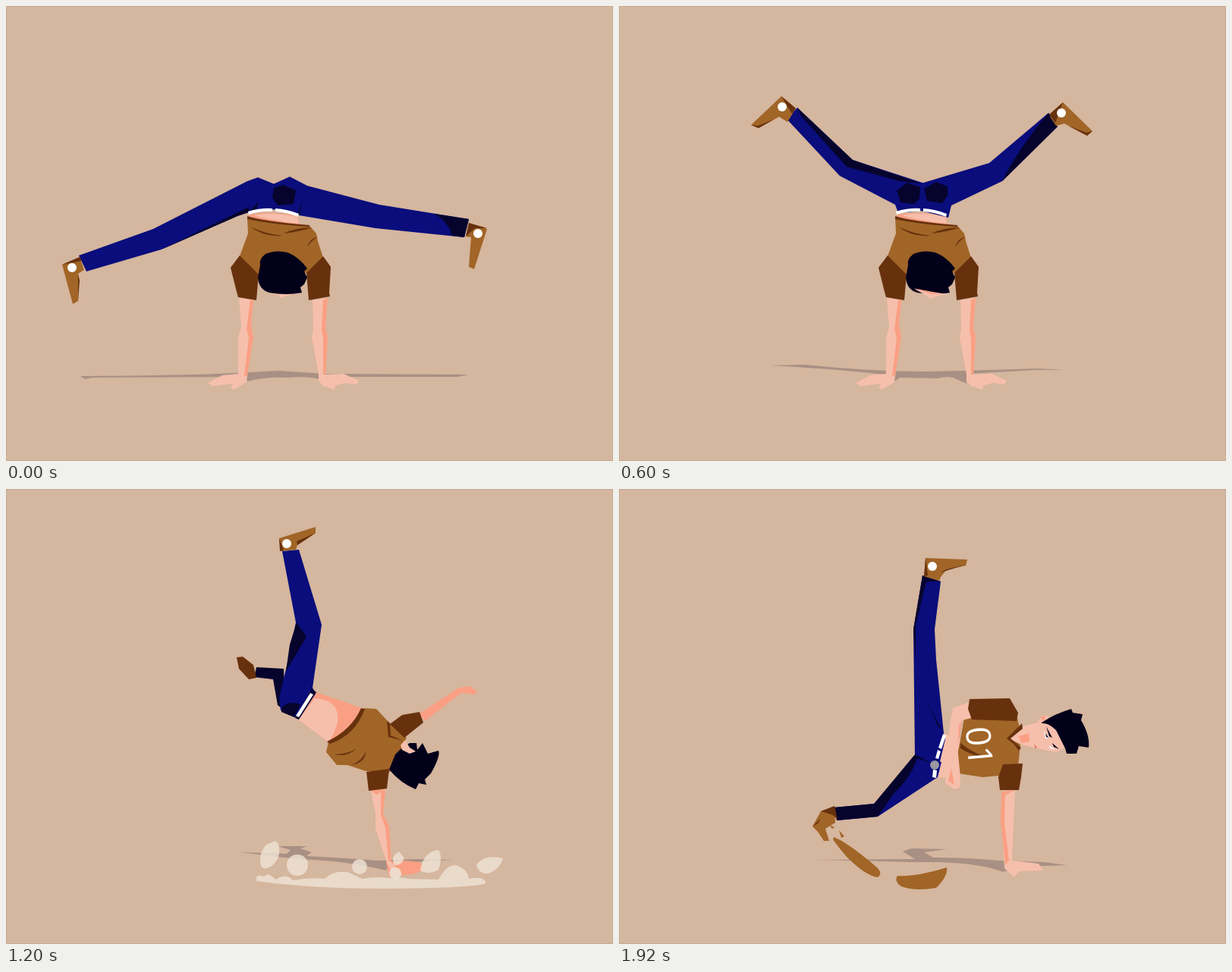
These frames come from a looping animation (800x600 px, 1.95 s). An HTML page with a canvas:

```html
<!DOCTYPE html>
<html lang="en">
<head>
<meta charset="utf-8">
<title>Breakdancer</title>
<style>
html, body { margin: 0; width: 100%; height: 100%; overflow: hidden; background: #d5b69e; }
canvas { display: block; }
</style>
</head>
<body>
<canvas id="stage" width="800" height="600"></canvas>
<script>
const ctx = document.getElementById('stage').getContext('2d');
const LOOP = 1950, STEP = 30, SAMPLES = 90, FX_TIME = 95;
const colours = {
  n: '#0a0d7b', d: '#06042d', b: '#a16527', k: '#68310e', s: '#f6bfac', o: '#fa9f83',
  h: '#03001a', g: '#a99084', w: '#fff', m: '#9a98a0', r: '#d9654f', u: 'rgba(238,226,213,.82)'
};

// Moves or mirrors part lines; mirroring also swaps left and right limbs.
function move(lines, sx, dx, dy = 0) {
  return lines.map(line => {
    const text = line.replace(/(\d+) (\d+)/g, (_, x, y) => `${sx * x + dx} ${+y + dy}`);
    return sx > 0 ? text : text.replace(/(arm|sleeve)([LR])/g, (_, p, c) => p + (c === 'L' ? 'R' : 'L'));
  });
}

// Part line: "name>parent colour shape"; shape is a path, O (dot) or T (number on the shirt).
const upper = [
  'armL s M307 385 326 388 323 420 326 437 318 487 317 496 300 506 296 503 300 498 272 501 266 497 285 487 306 485 306 437 310 423Z',
  '>armL o M322 388 326 388 323 420 326 437 318 487 314 488 320 438 317 426Z',
  'armR s M404 388 424 385 421 425 424 437 421 486 445 485 465 494 462 499 446 497 434 501 433 506 418 501 412 494 412 486 403 437 405 425Z',
  '>armR o M418 388 424 385 421 425 424 437 421 486 418 486 418 438 416 427Z',
  'waist>torso o M320 275Q350 270 385 277L387 289Q345 288 320 278Z',
  '>torso s M326 276Q350 271 384 278L386 287Q350 283 326 276Z',
  'torso b M318 278Q335 286 400 290L409 300 411 310 418 332 397 352 333 356 308 330 319 300Z',
  '>torso k M318 277Q340 284 400 289L400 291Q350 288 318 281Z',
  '>torso k M322 291Q340 305 364 303Q340 300 322 291M366 300Q382 292 404 292Q385 298 366 300M397 318Q401 306 411 304Q403 309 397 318Z',
  'sleeveL k M308 329 296 345 304 377 306 384 330 388 333 354Z',
  'sleeveR k M418 330 428 344 426 378 427 383 399 388 396 352Z',
  'face>hair s M342 374 390 378 366 383 364 386 360 382Z',
  'hair h M335 342Q333 334 342 327Q355 321 371 325Q386 331 397 346L393 350 397 358 393 367 388 371 390 378Q370 382 347 378Q333 374 332 358Z'
];
const belt = '>torso w M319 271Q336 266 351 267L351 271Q336 270 320 275ZM355 267Q371 268 386 274L385 278Q370 272 355 271Z';
const handstand = (dx, legs) => [...legs.slice(0, 1), ...move(upper, 1, dx), ...legs.slice(1), ...move([belt], 1, dx)];

// Seated body, facing the viewer.
const seated = [
  'armL s M388 302 402 300 402 325 390 325Z',
  'armR s M449 386 470 388 466 420 490 488 508 496 505 500 476 504 452 420Z',
  '>armR o M449 387 455 388 454 420 450 420Z',
  'sleeveL k M377 306Q385 290 403 287L428 296 412 300 388 308Z',
  'torso b M384 300 404 290 425 295 450 311 468 334 445 348 441 365Q415 383 383 390L376 394 365 370 353 330 375 312Z',
  '>torso k M354 332 372 368Q378 382 384 389L376 394 362 365ZM362 345Q382 352 398 374Q382 356 362 345Z',
  'sleeveR k M453 338 468 334 477 352 471 387 446 389 442 372 443 350Z',
  '>torso k M428 294 420 308 416 318 425 315 451 312 446 308 426 311Z',
  '>hair s M432 288 428 298 427 310 446 313 456 298Z',
  '>hair o M434 295 431 308 438 309 446 297Z',
  'face>hair s M444 253Q434 272 431 288L434 294 447 299 466 299 478 296 477 286 456 256Z',
  '>hair w M443 262 451 266 449 269 442 266ZM452 276 463 281 460 285 452 281Z',
  '>hair h M443 258 451 266 452 263ZM451 273 466 281 466 284ZM445 263 448 265 445 267ZM455 278 459 280 456 282Z',
  '>hair r M437 285 445 289 444 291ZM446 269 440 277 444 279 441 276Z',
  'hair h M453 250 450 242 460 235 464 224Q471 219 479 234Q491 239 496 252L504 249 503 262 499 269 503 273Q492 283 475 288L471 293 465 280Q455 270 450 257L446 248Z'
];
const bigShoe = 'M322 500Q318 470 330 460Q355 450 380 448L440 422 490 415Q525 420 530 436Q520 470 470 500Q435 518 420 517Q392 517 382 526Q375 538 352 538Q322 532 322 500Z';
const shoeTrim = parent => [
  `>${parent} k M324 484Q324 462 335 449Q355 441 380 449Q366 462 360 474Q340 486 324 484Z`,
  `>${parent} w M333 473Q333 455 346 453Q356 455 357 461Q345 465 333 473Z`,
  `>${parent} k M359 478Q362 495 368 508L382 525 377 525Q365 508 359 478ZM378 449 440 421 425 424Q395 434 378 449Z`
];

const poses = [
  [0, handstand(0, [
    'shadow g M98 488Q250 487 300 484L360 481 420 485 610 486 595 489 430 489 412 492Q400 488 370 490Q340 489 318 495L316 489 115 490 104 492Z',
    'legA n M354 235 332 226 318 231 194 294 96 329 106 350 205 321 305 277 320 272 354 268Z',
    'legB n M352 235 374 225 397 237 492 262 610 281 604 305 487 293 386 276 352 268Z',
    '>legB d M564 274Q582 283 588 303L604 305 610 281Z',
    '>torso d M365 236 382 243 379 261 358 263 351 253 353 240ZM320 272 333 258 330 268ZM385 276 390 254 387 276Z',
    '>legA d M205 321 320 265 320 272 305 277Z',
    'shoeA b M74 341 88 393 95 389 95 353 103 348 97 331Z',
    '>shoeA k M74 341 97 331 100 336ZM95 353 97 362 95 389Z',
    '>shoeA w O 87 345 6',
    'shoeB b M634 294 617 347 610 344 613 305 606 304 610 286Z',
    '>shoeB k M606 304 610 286 634 293 618 293Z',
    '>shoeB w O 622 300 6'
  ])],
  [360, [
    'shadow g M307 479 330 478 480 492 522 495 505 499 480 496 330 488 320 487Z',
    ...seated,
    '>torso w T 402 338 34',
    'legB n M350 400 384 430 378 450 324 462Z',
    'legA n M384 430 372 390 352 330 314 203 302 206 328 372 341 408 324 462 378 450Z',
    '>legA d M302 206 312 204 346 325Q334 345 329 372Z',
    'shoeA b M298 193 301 207 313 203 329 190 329 183 314 187Z',
    '>shoeA w O 304 198 4',
    '- b M247 211Q270 199 299 196L296 202Q275 206 250 211ZM229 214Q212 217 198 231Q215 227 229 214ZM214 229Q203 231 195 239Q210 242 214 229ZM183 236Q158 246 149 265L150 272Q159 260 183 236Z',
    '- d M291 221Q265 228 252 244L255 246Q270 235 292 225ZM252 253 240 262 244 264ZM173 297Q155 315 144 343Q149 346 158 325Q167 312 174 299Z',
    'shoeB b ' + bigShoe,
    ...shoeTrim('shoeB'),
    '>shoeB k M425 518Q480 500 513 458Q525 436 485 414L508 410Q530 395 543 377L545 381Q520 410 517 418L531 435Q560 415 574 399L577 403Q540 450 505 488Q470 515 425 518Z',
    '>shoeB s M494 414Q508 414 517 421Q506 417 494 416Z',
    '- k M600 288Q607 291 600 305Q582 344 566 351Q561 349 570 340Q583 300 596 289ZM598 342Q600 350 580 385Q560 412 548 413Q544 408 555 392Q582 348 598 342Z'
  ]],
  [600, handstand(46, [
    'shadow g M200 474 245 473Q330 482 405 482Q500 480 550 478L588 480 550 480 458 485 458 498 440 490Q430 488 420 491L370 490 362 496 350 486Q290 479 200 474Z',
    'legA n M400 233 308 203 235 134 221 149 291 224 364 262 368 273 400 270Z',
    '>legA d M235 134 308 203 398 234 370 231 300 212 240 145Z',
    'legB n M398 234 488 207 566 141 578 159 505 231 438 263 434 279 398 270Z',
    '>legB d M566 141 578 159 505 231Q525 190 566 141Z',
    '>torso d M380 233 397 239 396 254 389 261 371 259 366 243ZM418 232 433 238 433 250 426 260 406 257 402 241Z',
    '>hair s M389 373 432 380 414 384 410 386 406 382Z',
    '>hair o M389 372 425 380 412 380Z',
    'shoeA b M214 119 174 157 184 161 211 146 222 153 233 135Z',
    '>shoeA k M214 119 233 135 228 142ZM174 157 184 161 205 149 183 158Z',
    '>shoeA w O 215 133 6',
    'shoeB b M585 127 624 165 617 171 587 155 576 158 568 146Z',
    '>shoeB k M585 127 567 143 575 154ZM624 165 617 171 592 158 616 167Z',
    '>shoeB w O 583 141 6'
  ])],
  [960, [
    'shadow g M360 492 395 489 385 482 430 481 490 479 455 484 490 487 520 496 460 492 425 494 395 495Z',
    'armL o M401 438 418 440 414 482 425 488 425 495 412 500 396 498 397 489 404 484Z',
    'armR o M488 350 492 336 515 348 533 408 529 420 517 421 506 412 512 406 525 404 508 360Z',
    'sleeveL k M420 360 430 358 425 375 421 374Z',
    'waist>torso s M419 352 422 302 435 285 457 318Q440 343 419 352Z',
    '>torso o M419 352 422 300 433 288 422 315Z',
    'torso b M420 352Q442 344 457 318L473 317 492 333 490 347 470 348 445 368 423 400Z',
    '>torso k M418 352Q441 343 456 318L460 320Q445 346 419 355Z',
    'sleeveR k M474 325 492 333 490 350 468 347Z',
    'legB n M414 262 385 270 394 260 430 235 460 210 481 169 492 172 470 234 438 265 434 280Z',
    '>legB d M460 210 481 169 492 172 470 236Q445 234 428 238Z',
    '>legA d M392 262 380 280 380 290 388 312ZM416 272 438 262 434 292 421 298Z',
    'legA n M414 262 392 262 387 300 384 345 375 391 422 402 418 370 421 306 422 280 434 264Z',
    '>legA d M419 345Q412 375 384 390L422 402 418 372Z',
    '>torso w M422 290 432 281 434 285 424 293Z',
    'face>hair s M431 376 438 373 440 364 470 351 478 360 476 378 442 386 432 383Z',
    '>hair o M431 376 437 374 440 386 433 383ZM449 359 456 358 455 367Z',
    '>hair w M441 375 451 369 453 373 443 379ZM458 366 471 360 472 364 460 369Z',
    '>hair h M443 381 453 374 453 377ZM459 367 472 364 460 370Z',
    'hair h M437 385 441 382 475 375 481 363 484 370 492 369 497 375 496 386 507 388Q503 403 478 409L470 420 463 415 457 417Q447 402 437 385Z',
    'shoeB b M498 162 516 187 511 189 493 175 487 171 487 165Z',
    '>shoeB w O 495 169 3',
    'shoeA b M380 392Q362 398 362 413Q366 430 382 436L448 464 494 469 504 451 465 421 422 402Z',
    '>shoeA k M465 421 504 451 494 469 448 464Q469 448 465 421ZM373 396 380 391 422 402 432 407Q400 399 373 396Z',
    '>shoeA w M384 397Q390 388 397 397Z',
    '- u M534 527Q555 516 570 519L565 523Q585 515 598 510Q612 509 614 516Q630 512 642 514L640 518Q660 512 676 503Q681 500 674 494Q675 487 683 488Q689 495 684 506Q670 518 600 525Z'
  ]],
  [1200, [
    'shadow g M308 479 370 481 375 476 358 471 397 471 388 474 403 479 396 484Q450 487 490 490L540 488 588 489 540 492 503 500 500 503Q450 490 385 488Z',
    'legA d M368 285 366 237 330 235 327 248 352 251 358 285 372 296Z',
    'shoeA k M326 232 312 221 304 222 307 237 320 251 330 249Z',
    'armR o M545 296 597 262 612 260 621 267 617 271 600 269 552 306Z',
    '>armL o M501 492 525 490 545 492 553 500 540 507 505 512Z',
    'armL s M481 398 500 396 497 428 505 445 508 492 522 509 512 514 501 490 487 448 487 428Z',
    '>armL o M494 397 500 396 497 428 505 445 508 492 504 490 500 447 494 430ZM481 398 500 396 488 403Z',
    'waist>torso o M409 268 472 290Q455 330 424 333L385 304Z',
    '>torso s M407 276Q441 278 437 308Q430 330 424 333L385 304Z',
    'legB n M372 225 382 176 364 82 386 80 416 179 404 262 408 270 385 303 362 292 360 275Z',
    '>legB d M383 176 396 195 369 240 374 205ZM364 287Q375 279 388 284L380 301 363 294ZM403 263 409 268 386 304 381 302Z',
    '>torso w M401 269 405 271 386 301 382 299Z',
    'torso b M472 289 488 290 504 307 528 328 505 374 474 372 450 364 436 364 422 347 425 333Q455 320 472 289Z',
    '>torso k M468 289 473 290Q460 325 427 336L423 333Q455 318 468 289M432 350Q450 350 462 342Q450 354 432 350M455 364Q470 358 474 346Q474 361 455 364M502 306 506 309 507 325 524 332 504 327Z',
    'sleeveR k M506 310 522 298 545 294 550 308 525 328Z',
    'sleeveL k M475 373 505 369 502 395 478 398Z',
    'hair h M522 341 532 335 541 335 542 344 549 335 556 349 570 345Q573 352 560 375L552 383 554 390 544 388 540 396Q520 388 505 370L513 350Z',
    'face>hair s M526 331 520 338 522 344 532 349 540 346 532 341Z',
    'shoeB b M360 65 408 50 408 58 384 74 382 80 362 82Z',
    '>shoeB k M360 65 366 81 361 82ZM383 69 408 58 384 74Z',
    '>shoeB w O 370 72 6',
    '- u M330 517Q328 506 340 511Q345 504 355 515Q370 506 378 516Q400 512 420 514Q430 503 450 505L470 514Q490 510 510 514Q520 511 530 514L570 515Q580 496 592 496Q608 500 610 514Q632 510 632 520Q620 526 500 527Q400 527 330 517Z',
    '- u M355 464Q364 470 358 488Q348 504 337 499Q331 483 343 469ZM570 476Q576 485 570 502Q556 510 546 503Q550 478 570 476ZM655 487Q652 500 636 507Q622 508 620 495Q632 481 655 487ZM525 487Q521 497 512 496Q506 485 518 478Z',
    '- u O 384 496 14',
    '- u O 466 498 10',
    '- u O 513 507 8'
  ]],
  [1680, [
    'shadow g M296 491 320 489 480 492 340 498 310 494Z',
    ...move(seated, -1, 835, -2),
    '>torso w T 433 334 -36',
    'legA n M480 400 446 430 450 450 502 463Z',
    'legB n M446 430 458 392 481 330 525 207 538 212 518 300 503 375 490 410 502 465 450 450Z',
    '>legB d M528 208 538 212 504 372Q500 346 487 330Z',
    'shoeB b M543 199 539 214 526 208 511 194 512 187 525 191Z',
    '>shoeB w O 535 203 4',
    '- n M488 418Q505 411 510 418Q505 427 488 428ZM488 436Q500 442 510 434Q525 432 536 412Q545 404 552 410Q551 420 535 424Q522 434 505 442L510 448 498 455Z',
    '- b M503 485 550 474 553 479 588 462Q615 435 620 405Q622 440 600 465Q560 510 510 527Q495 532 480 525ZM613 374Q620 385 618 399L614 390ZM589 455 597 450 593 457Z',
    ...move(['shoeA b ' + bigShoe, ...shoeTrim('shoeA')], -1, 825, 3),
    '>shoeA k M345 412 310 417Q295 430 298 442Q315 480 350 502L403 518Q330 485 312 450Q306 425 345 412Z'
  ]],
  [1920, [
    'shadow g M258 489 390 488 374 478 385 474 432 475 402 479 414 486Q460 486 500 490L560 492 590 496 530 498 506 505Q480 494 420 492L385 492Q320 490 258 489Z',
    'armR s M504 399 522 397 520 440 518 490 553 494 559 503 527 504 521 512 508 500 504 440Z',
    '>armR o M504 399 509 399 508 440 514 490 509 496 503 438ZM504 399 522 397 508 404Z',
    'waist>torso s M428 322 450 330 448 378 432 381 416 380 420 355Z',
    'legB n M390 355 388 185 400 114 424 122 416 185 418 225 428 322 430 330 418 380 390 360Z',
    '>legB d M388 185 400 114 424 122 405 122 391 180 391 225ZM403 272Q415 300 426 318L420 312Z',
    'legA n M392 350 385 360 338 415 283 420 287 437 341 432 420 380 425 360Z',
    '>legA d M390 350 336 415 283 420 287 437 341 432 362 402Q385 380 393 355L412 362Z',
    '>torso w M427 323 431 325 425 343 421 341ZM420 344 424 346 421 356 417 355ZM414 370 419 371 418 381 413 380Z',
    '>torso m O 416 364 6',
    'torso b M462 300 525 302 530 325 526 367 502 378 479 380 447 375 444 360 450 330 455 302Z',
    '>torso k M450 335Q465 347 480 352Q465 352 450 342Z',
    'armL s M440 289 462 281 464 302 452 305 446 340 450 380 449 394 442 396 430 388 434 345 436 310Z',
    '>armL o M438 368 442 390 434 385ZM452 305 446 340 448 312Z',
    'sleeveL k M462 277 515 276 526 295 524 306 465 304 460 290Z',
    'sleeveR k M506 363 532 362 530 380 527 397 502 397 500 380Z',
    '>torso w T 475 339 85',
    'face>hair s M514 329 535 312 552 308 556 300 563 298 575 312 588 340 577 347 560 344 530 337Z',
    '>hair o M527 326 540 322 541 333 530 335ZM555 301 562 299 561 307Z',
    '>hair k M531 309 511 329 520 336 527 345 530 341 516 329 532 316Z',
    '>hair w M560 319 566 329 562 329ZM567 338 575 344 568 342Z',
    '>hair h M563 313 571 328 567 326ZM571 335 580 343 573 340ZM562 322 566 328 563 327Z',
    '>hair r M547 336 551 341 549 342Z',
    'hair h M557 308Q575 296 596 290L598 295 611 297 609 305Q621 325 619 341L606 339 603 349 590 349 588 342Q582 330 576 318Q566 308 557 309Z',
    'shoeB b M404 91 459 93 457 101 432 106 424 116 422 121 402 115Z',
    '>shoeB k M404 91 407 114 402 115ZM424 110 457 100 431 106Z',
    '>shoeB w O 413 102 6',
    'shoeA b M266 425 255 445 262 452 270 464 277 464 272 448 285 440 284 418Z',
    '>shoeA k M266 425 284 418 288 436 282 430ZM255 445 266 434 262 441Z',
    '- b M283 459Q300 465 340 499Q348 507 341 512Q325 510 300 485Q285 467 282 462ZM367 510Q390 512 432 499Q434 510 418 526Q390 531 372 524Q362 517 367 510ZM290 450 297 458 293 460ZM277 443 284 446 281 448Z'
  ]]
].map(([time, lines]) => {
  const parts = lines.map(parse);
  return { time, parts, byName: new Map(parts.filter(p => p.name).map(p => [p.name, p])) };
});

function parse(line) {
  const [, label, colour, shape] = line.match(/(\S+) (\S+) (.+)/);
  const [name, parent] = label === '-' ? [] : label.split('>');
  const part = { name, parent, fx: label === '-', colour: colours[colour], kind: shape[0] };
  if (part.kind === 'M') {
    part.path = new Path2D(shape);
    if (name) part.points = sample(shape);
  } else part.args = shape.slice(2).split(' ').map(Number);
  return part;
}

// Evenly spaced outline points, always in the same turning direction.
function sample(d) {
  const path = document.createElementNS('http://www.w3.org/2000/svg', 'path');
  path.setAttribute('d', d);
  const length = path.getTotalLength();
  const pts = Array.from({ length: SAMPLES }, (_, i) => {
    const p = path.getPointAtLength(length * i / SAMPLES);
    return [p.x, p.y];
  });
  const area = pts.reduce((sum, [x, y], i) => {
    const [nx, ny] = pts[(i + 1) % SAMPLES];
    return sum + x * ny - nx * y;
  }, 0);
  return area < 0 ? [pts[0], ...pts.slice(1).reverse()] : pts;
}

const mix = (p, q, w) => p.map(([x, y], i) => [x + (q[i][0] - x) * w, y + (q[i][1] - y) * w]);
const centre = pts => [0, 1].map(k => pts.reduce((s, p) => s + p[k], 0) / pts.length);

// Turn, scale and shift that best carry the points p onto q.
function fit(p, q) {
  const [px, py] = centre(p), [qx, qy] = centre(q);
  let re = 0, im = 0, size = 0;
  p.forEach(([x, y], i) => {
    const a = x - px, b = y - py, c = q[i][0] - qx, d = q[i][1] - qy;
    re += a * c + b * d;
    im += a * d - b * c;
    size += a * a + b * b;
  });
  re /= size;
  im /= size;
  return [re, im, -im, re, qx - re * px + im * py, qy - im * px - re * py];
}

function paint(part, scale = 1) {
  ctx.fillStyle = part.colour;
  if (part.kind === 'M') return ctx.fill(part.path);
  const [x, y, n] = part.args;
  if (part.kind === 'O') {
    ctx.beginPath();
    ctx.arc(x, y, n * scale, 0, 7);
    ctx.fill();
  } else {
    ctx.save();
    ctx.translate(x, y);
    ctx.rotate(n * Math.PI / 180);
    ctx.fillText('01', 0, 16);
    ctx.restore();
  }
}

function fillPoints(pts, colour) {
  ctx.fillStyle = colour;
  ctx.beginPath();
  pts.forEach(p => ctx.lineTo(...p));
  ctx.fill();
}

function draw(t) {
  ctx.fillStyle = '#d5b69e';
  ctx.fillRect(0, 0, 800, 600);
  ctx.strokeStyle = '#c6aa95';
  ctx.strokeRect(.5, .5, 799, 599);
  ctx.font = '500 45px "Open Sans", sans-serif';
  ctx.textAlign = 'center';

  const i = poses.filter(p => p.time <= t).length - 1;
  const from = poses[i], to = poses[i + 1] || from;
  const u = (t - from.time) / (to.time - from.time || 1);
  const [near, far, w] = u < .5 ? [from, to, u] : [to, from, 1 - u];
  const away = Math.abs(t - near.time);

  for (const part of near.parts) {
    if (part.fx) {
      if (away < FX_TIME) paint(part, 1 - away / 240);
      continue;
    }
    const twin = far.byName.get(part.name);
    if (!w) paint(part);
    else if (twin) fillPoints(mix(part.points, twin.points, w), part.colour);
    else {
      const rest = near.byName.get(part.parent).points;
      ctx.save();
      ctx.transform(...fit(rest, mix(rest, far.byName.get(part.parent).points, w)));
      paint(part);
      ctx.restore();
    }
  }
}

function frame() {
  let t = Math.floor(performance.now() % LOOP / STEP) * STEP;
  if (t === 30 || t === 390) t -= STEP; // two poses are held twice as long
  draw(t);
  requestAnimationFrame(frame);
}
frame();
</script>
</body>
</html>
```
